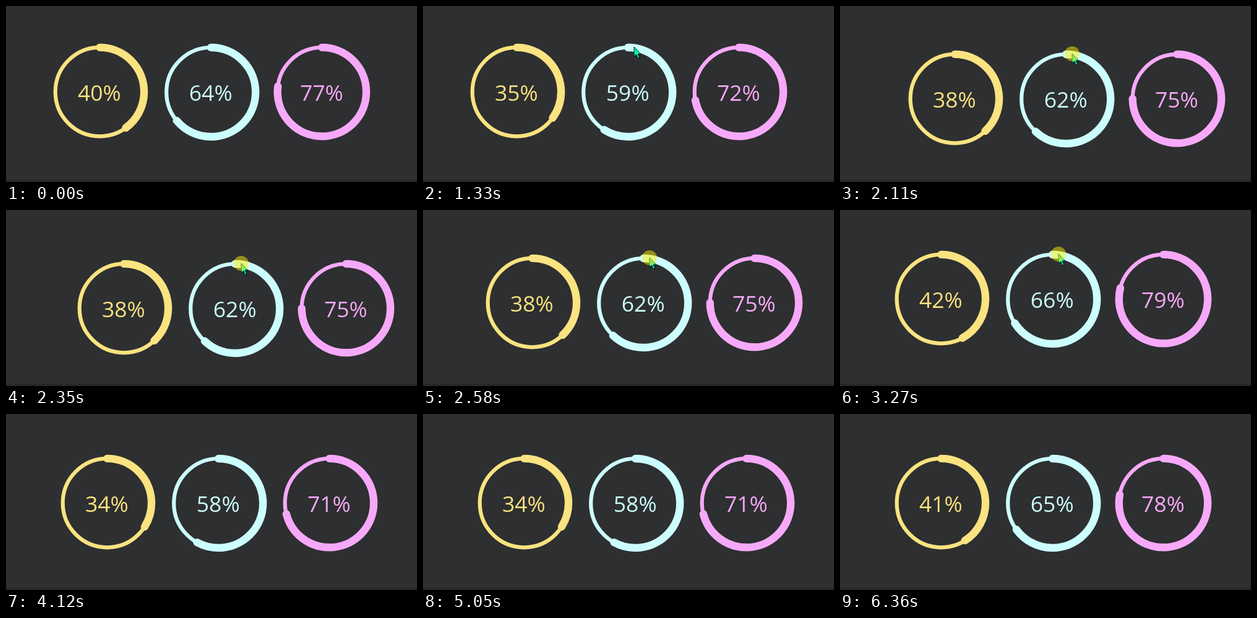
Recreate the animation shown at these times as an HTML page. Size 664 by 284 pixels, loop 6.45 s.

```html
<!DOCTYPE html>
<html lang="en">
<head>
<meta charset="utf-8">
<title>Progress rings</title>
<style>
  html, body { margin: 0; width: 100%; height: 100%; overflow: hidden; background: #2e2f30; }
  svg { display: block; width: 664px; height: 284px; }
  text { font: 400 35.5px "Open Sans", "Noto Sans", sans-serif; text-anchor: middle; }
  circle { fill: none; }
</style>
</head>
<body>
<svg viewBox="0 0 664 284">
  <rect width="664" height="284" fill="#2e2f30"/>
  <rect y="280" width="664" height="4" fill="#2b262a"/>
  <g id="rings"></g>
  <g id="cursor">
    <path d="M0 0V15.5L3.6 12.3L6.2 18.2L8.8 17L6.2 11.4H10.8Z" transform="translate(1.5 1.5)" fill-opacity=".4"/>
    <path d="M0 0V15.5L3.6 12.3L6.2 18.2L8.8 17L6.2 11.4H10.8Z" fill="#00f5b0" stroke="#15181a"/>
    <circle id="halo" r="12" style="fill:#fff000;fill-opacity:.5"/>
  </g>
</svg>
<script>
  const LOOP = 6450, FRAME = LOOP / 83;
  const DRAG_START = 1500, DRAG_END = 3300;
  const GRIP = { x: 341, y: 66 };
  const NS = 'http://www.w3.org/2000/svg';
  const [rings, cursor, halo] = ['rings', 'cursor', 'halo'].map(id => document.getElementById(id));

  // Pointer path relative to the grip: [ms, x, y]. The rings follow it while dragged.
  const path = [
    [380, 231, 212], [1010, 0, 10], [1150, 0, 0], [1700, 0, 0],
    [2098, 34, 11], [2409, 41, 23], [2564, 25, 11], [2800, 16, 15],
    [3030, 13, 13], [3260, 12, 5], [3500, 12, 5], [4040, 100, 234],
    [6300, 293, 234], [6370, 293, 228]
  ];

  function add(parent, tag, attrs) {
    const el = document.createElementNS(NS, tag);
    for (const key in attrs) el.setAttribute(key, attrs[key]);
    return parent.appendChild(el);
  }

  function makeRing(cx, cy, r, color, offset) {
    const base = { cx, cy, r, stroke: color };
    add(rings, 'circle', { ...base, 'stroke-width': 6.2 });
    const arc = add(rings, 'circle', {
      ...base, 'stroke-width': 12.4, 'stroke-linecap': 'round',
      pathLength: 100, transform: `rotate(-90 ${cx} ${cy})`
    });
    const label = add(rings, 'text', { x: cx - 0.5, y: 153, fill: color });
    return value => {
      arc.setAttribute('stroke-dasharray', `${value + offset} 100`);
      label.textContent = `${value + offset}%`;
    };
  }

  const setters = [
    makeRing(151.4, 138.6, 71.7, '#fae380', 0),
    makeRing(331.2, 139, 72, '#ccfeff', 24),
    makeRing(510.4, 138.6, 71.7, '#f6a9f9', 37)
  ];

  const clamp = (v, lo, hi) => Math.min(hi, Math.max(lo, v));

  function along(ms) {
    const t = clamp(ms, path[0][0], path[path.length - 1][0]);
    const i = Math.max(1, path.findIndex(key => key[0] >= t));
    const [t0, x0, y0] = path[i - 1], [t1, x1, y1] = path[i];
    const p = (t - t0) / (t1 - t0);
    return { x: x0 + (x1 - x0) * p, y: y0 + (y1 - y0) * p };
  }

  const move = (el, x, y) =>
    el.setAttribute('transform', `translate(${Math.round(x)} ${Math.round(y)})`);
  const show = (el, on) => { el.style.display = on ? '' : 'none'; };

  // The value climbs 3.3 a second and wraps within 34 to 44.
  function valueAt(ms) {
    const second = Math.floor((ms + 955) / 1000);
    return 34 + Math.floor(6 + 3.3 * second) % 11;
  }

  function render(time) {
    // The picture refreshes in even steps, about 13 per second.
    const ms = Math.floor((time % LOOP) / FRAME) * FRAME;
    const value = valueAt(ms);
    setters.forEach(set => set(value));

    const shift = along(clamp(ms, DRAG_START, DRAG_END));
    move(rings, shift.x, shift.y);
    const hand = along(ms);
    move(cursor, GRIP.x + hand.x, GRIP.y + hand.y);
    show(cursor, ms > 380);
    show(halo, ms < 1240 || ms > 1800);
  }

  const start = performance.now();
  function tick() {
    render(performance.now() - start);
    requestAnimationFrame(tick);
  }
  tick();
</script>
</body>
</html>
```
